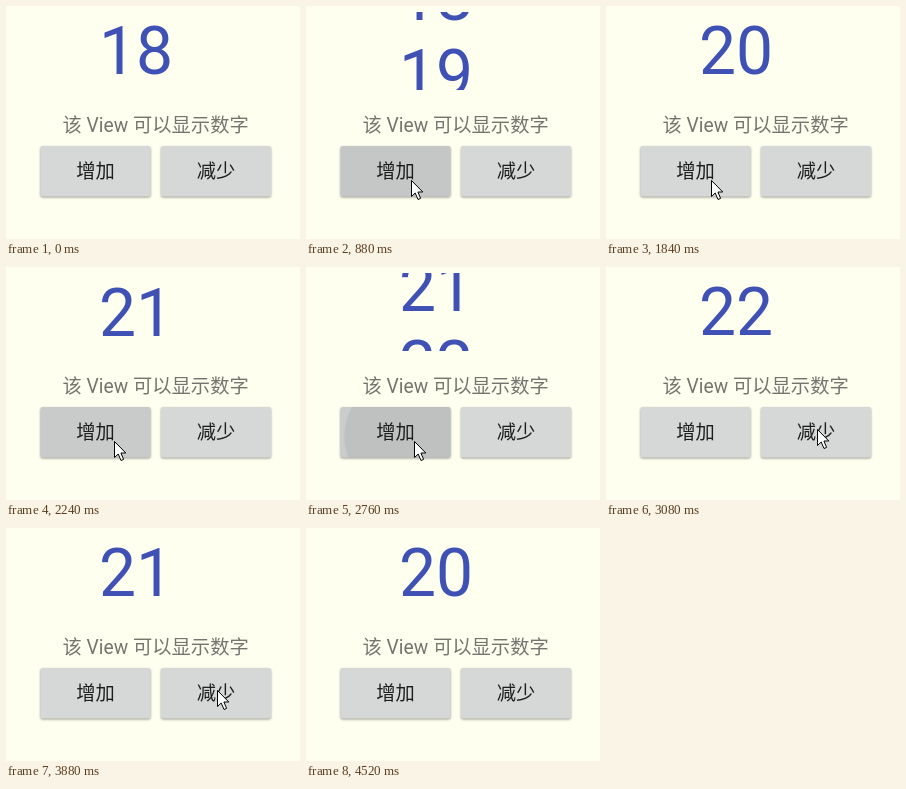
An HTML page that plays this animation: 294x233 px, repeating every 5200 ms.

```html
<!DOCTYPE html>
<html lang="zh-CN">
<head>
<meta charset="utf-8">
<title>数字滚动</title>
<style>
  html, body { margin: 0; width: 100%; height: 100%; overflow: hidden; background: #fffff0; }
  svg { display: block; width: 294px; height: 233px; }
  text { font: 19.3px Roboto, "Noto Sans CJK SC", "Noto Sans CJK", sans-serif; }
  .num { font: 66px Roboto, sans-serif; fill: #3f51b5; }
  .hint { fill: #757570; }
  .face { fill: #d6d7d7; filter: drop-shadow(0 1px 1.2px rgba(0, 0, 0, .38)); }
  .label { fill: #1e1e1e; text-anchor: middle; }
</style>
</head>
<body>
<svg viewBox="0 0 294 233">
  <defs>
    <clipPath id="window"><rect x="80" y="6" width="110" height="78"/></clipPath>
    <clipPath id="add"><rect x="34.5" y="140" width="110" height="50.5" rx="2"/></clipPath>
    <clipPath id="sub"><rect x="155" y="140" width="110" height="50.5" rx="2"/></clipPath>
  </defs>
  <rect width="294" height="233" fill="#fffff0"/>

  <g clip-path="url(#window)">
    <text class="num" x="93"></text>
    <text class="num" x="93"></text>
  </g>
  <text class="hint" x="56.5" y="126">该 View 可以显示数字</text>

  <rect class="face" x="34.5" y="140" width="110" height="50.5" rx="2"/>
  <rect class="face" x="155" y="140" width="110" height="50.5" rx="2"/>
  <g id="ripple">
    <rect x="30" y="136" width="240" height="60"/>
    <circle/>
  </g>
  <text class="label" x="89.5" y="172">增加</text>
  <text class="label" x="210" y="172">减少</text>

  <path id="cursor" d="M.5 .5V16.5L4.2 13L7 19.5L9.6 18.4L6.9 12H11.8Z"
        fill="#fff" stroke="#000" stroke-linejoin="round"/>
</svg>
<script>
  const LOOP = 5200, TICK = 40, ROLL = 300, PITCH = 77, BASE = 67.5;

  // press time, delay before the number rolls, direction
  const clicks = [
    { at: 640, wait: 51, dir: 1 },
    { at: 1320, wait: 51, dir: 1 },
    { at: 1960, wait: 9, dir: 1 },
    { at: 2640, wait: 9, dir: 1 },
    { at: 3440, wait: 9, dir: -1 },
    { at: 4040, wait: 51, dir: -1 }
  ];

  const nums = document.querySelectorAll('.num');
  const ripple = document.getElementById('ripple');
  const [wash, ring] = ripple.children;
  const cursor = document.getElementById('cursor');

  const clamp = x => Math.min(1, Math.max(0, x));
  const span = (t, from, to) => clamp((t - from) / (to - from));
  const ease = x => .5 - Math.cos(Math.PI * x) / 2;
  const mix = (a, b, k) => a + (b - a) * k;
  const set = (el, attrs) => {
    for (const key in attrs) el.setAttribute(key, attrs[key]);
  };

  function drawNumber(t) {
    const value = clicks.reduce((sum, c) =>
      sum + c.dir * ease(span(t, c.at + c.wait, c.at + c.wait + ROLL)), 18);
    const first = Math.floor(value + 1e-6);
    nums.forEach((el, i) => {
      el.textContent = first + i;
      set(el, { y: BASE + (first + i - value) * PITCH });
    });
  }

  function cursorAt(t) {
    if (t < 600) {
      const k = ease(span(t, 80, 600)), j = 1 - k;
      return [
        j * j * 262 + 2 * j * k * 190 + k * k * 105,
        j * j * 14 + 2 * j * k * 205 + k * k * 174
      ];
    }
    const k = ease(span(t, 2920, 3080));
    return [mix(t < 1960 ? 105 : 108, 211, k), mix(174, 162, k)];
  }

  function drawRipple(t) {
    const c = clicks.find(c => t >= c.at && t < c.at + c.wait + 430);
    ripple.style.display = c ? '' : 'none';
    if (!c) return;
    const age = t - c.at;
    const fade = 1 - span(age, 160, 440 + c.wait / 2);
    const [x, y] = cursorAt(c.at);
    const k = span(age, 0, 240);
    ripple.setAttribute('clip-path', c.dir > 0 ? 'url(#add)' : 'url(#sub)');
    set(wash, { 'fill-opacity': .05 * span(age, -40, 80) * fade });
    set(ring, {
      cx: mix(x, c.dir > 0 ? 89.5 : 210, k),
      cy: mix(y, 165, k),
      r: 10 + age * .42,
      'fill-opacity': .06 * fade
    });
  }

  function drawCursor(t) {
    const shown = t >= 80 && t < 4520;
    cursor.style.display = shown ? '' : 'none';
    const [x, y] = cursorAt(t).map(Math.round);
    set(cursor, { transform: `translate(${x} ${y})` });
  }

  const start = performance.now();
  function frame() {
    const t = Math.floor((performance.now() - start) % LOOP / TICK) * TICK;
    drawNumber(t);
    drawRipple(t);
    drawCursor(t);
    requestAnimationFrame(frame);
  }
  frame();
</script>
</body>
</html>
```
